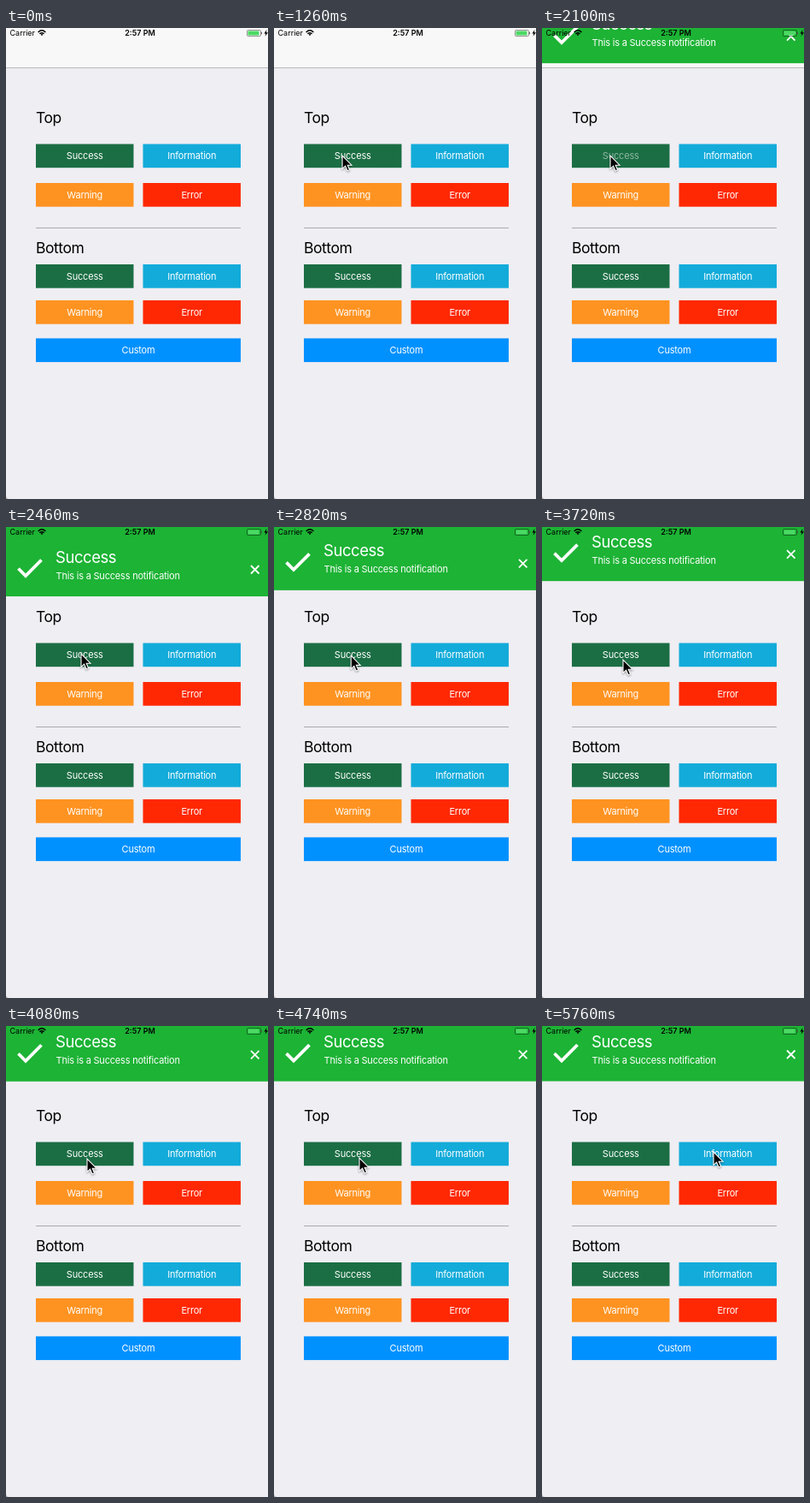
Animation of 307 by 550 pixels, one loop 8 s. Source, as an HTML page:

```html
<!DOCTYPE html>
<html lang="en">
<head>
<meta charset="utf-8">
<title>Notification banner</title>
<style>
html, body { margin: 0; width: 100%; height: 100%; overflow: hidden; background: #efeef3; }
svg { display: block; width: 307px; height: 550px; }
text { font: 11px Inter, Roboto, sans-serif; letter-spacing: -.2px; }
.status { font-size: 9px; letter-spacing: 0; }
.time { font-weight: 600; text-anchor: middle; }
.heading { font-size: 17.5px; letter-spacing: -.45px; }
.title { font-size: 18.5px; letter-spacing: -.45px; }
.button text { fill: #fff; text-anchor: middle; }
</style>
</head>
<body>
<svg viewBox="0 0 307 550">
  <rect width="307" height="550" fill="#efeef3"/>
  <path d="M0 546Q0 550 4 550H0Z" fill="#aaa"/>
  <rect width="307" height="46" fill="#f8f8f8"/>
  <path d="M0 46.5H307" stroke="#b9b9bc"/>
  <text class="heading" x="35" y="111">Top</text>
  <text class="heading" x="35" y="262.5">Bottom</text>
  <path d="M35 233.5H275" stroke="#aaa"/>
  <g id="buttons"></g>

  <g id="banner" fill="#fff">
    <rect y="-85.5" width="307" height="150" fill="#1db335"/>
    <path d="M14.5 32L23 40.5L41.5 22" fill="none" stroke="#fff" stroke-width="3.8"/>
    <text class="title" x="58" y="25">Success</text>
    <text x="58.5" y="44">This is a Success notification</text>
    <path d="M287 28.5l9.5 9.5m0-9.5l-9.5 9.5" stroke="#fff" stroke-width="1.8"/>
  </g>

  <text class="status" x="4.5" y="9">Carrier</text>
  <text class="status time" x="157" y="9">2:57 PM</text>
  <g fill="none" stroke="#000" stroke-width="1.4">
    <path d="M37.6 4.9Q42 .8 46.4 4.9M39.4 6.8Q42 4.5 44.6 6.8"/>
    <path d="M40.6 7.6L42 9.2L43.4 7.6Q42 6.6 40.6 7.6Z" fill="#000" stroke="none"/>
  </g>
  <rect x="282.5" y="2.5" width="16" height="7" rx="1.2" fill="none" stroke="#000" stroke-opacity=".5" stroke-width=".8"/>
  <rect x="283.5" y="3.5" width="13" height="5" fill="#4cd964"/>
  <path d="M299.4 4.8v2.4" stroke="#555"/>
  <path d="M305.4 2L302.5 6.4H304.4L303.6 9.8L307 5.3H305Z"/>

  <g id="cursor">
    <path d="M0 0V15.5L3.6 12.2L6 17.8L8.6 16.7L6.2 11.2H11Z" stroke="#fff" stroke-width="1.1"
      style="filter: drop-shadow(0 1px 1px rgba(0,0,0,.4))"/>
  </g>
</svg>
<script>
const LOOP = 8000, STEP = 60, PRESS = 1800, RELEASE = 1920;
const BANNER_HEIGHT = 64.5;
const $ = id => document.getElementById(id);

const success = ['Success', '#1b6e44'], info = ['Information', '#13abda'];
const warning = ['Warning', '#ff9321'], error = ['Error', '#ff2802'];
const button = ([label, color], x, y, w = 114.5) =>
  `<g class="button"><rect x="${x}" y="${y}" width="${w}" height="27.7" fill="${color}"/>
   <text x="${x + w / 2}" y="${y + 17.8}">${label}</text></g>`;
const row = (left, right, y) => button(left, 35, y) + button(right, 160.5, y);
$('buttons').innerHTML =
  row(success, info, 135.5) + row(warning, error, 181) +
  row(success, info, 276) + row(warning, error, 318) +
  button(['Custom', '#0091ff'], 35, 362.4, 240);
const pressedLabel = document.querySelector('.button text');

// Pointer path: time, x, y
const path = [
  [900, -12, 156], [1260, 80, 149], [2100, 80, 149], [2460, 88, 148],
  [2640, 88, 148], [3120, 95, 155], [4440, 95, 155], [4740, 100, 154],
  [4980, 201, 158], [5280, 201, 158], [5460, 201, 150], [5640, 201, 150],
  [5760, 201, 147], [LOOP, 201, 147]
];
const clamp = v => Math.min(1, Math.max(0, v));

function pointer(t) {
  const i = Math.max(1, path.findIndex(p => p[0] >= t));
  const [t0, x0, y0] = path[i - 1], [t1, x1, y1] = path[i];
  const k = clamp((t - t0) / (t1 - t0)), e = k * k * (3 - 2 * k);
  return [x0 + (x1 - x0) * e, y0 + (y1 - y0) * e];
}

// Damped spring: offset from rest, as a share of the banner height
const spring = t => t < RELEASE ? -1.1
  : .357 * Math.exp(.0021 * (2460 - t)) * Math.sin(.0036 * (t - 2238));

function draw(now) {
  const t = Math.floor(now % LOOP / STEP) * STEP;
  $('banner').setAttribute('transform', `translate(0 ${BANNER_HEIGHT * spring(t)})`);
  $('cursor').setAttribute('transform', `translate(${pointer(t)})`);
  $('cursor').setAttribute('visibility', t < 960 ? 'hidden' : 'visible');
  pressedLabel.setAttribute('opacity', t < PRESS ? 1 : .2 + .8 * clamp((t - RELEASE) / 470));
}

const start = performance.now();
(function tick() {
  draw(performance.now() - start);
  requestAnimationFrame(tick);
})();
</script>
</body>
</html>
```
